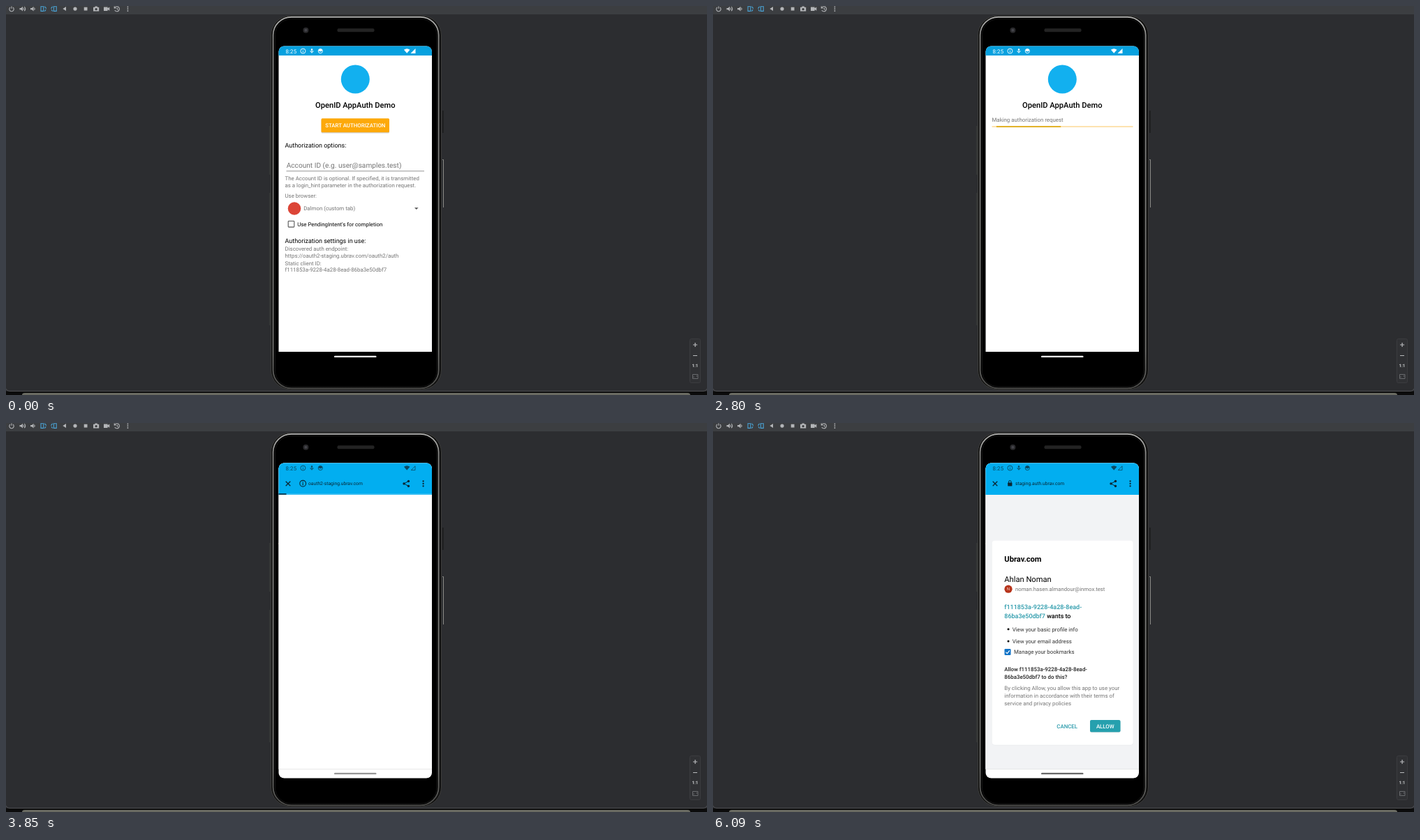
Write an HTML page that moves like this. It is 1004x558 px and loops after 8 s.

```html
<!DOCTYPE html>
<html lang="en">
<head>
<meta charset="utf-8">
<title>Authorization demo</title>
<style>
  html, body { margin: 0; width: 100%; height: 100%; overflow: hidden; background: #2c2d30; }
  svg { display: block; width: 1004px; height: 558px; }
  text { font-family: Roboto, "Open Sans", sans-serif; font-size: 7.86px; text-rendering: geometricPrecision; white-space: pre; }
  .mid { text-anchor: middle; }
  .med { font-weight: 500; }
  .h1 { font-size: 11.15px; }
  .h2 { font-size: 8.97px; }
  .hint { font-size: 10.15px; }
  .url { font-size: 6.73px; }
  .grey { fill: #757575; }
  .line { fill: none; stroke: currentColor; }
</style>
</head>
<body>
<svg viewBox="0 0 1004 558">
  <defs>
    <linearGradient id="rim" x1="0" x2="0" y1="0" y2="1">
      <stop offset="0" stop-color="#b4b4b2"/>
      <stop offset=".06" stop-color="#858583"/>
      <stop offset=".9" stop-color="#72726f"/>
      <stop offset="1" stop-color="#4a4a48"/>
    </linearGradient>
    <clipPath id="screen"><rect x="390.5" y="57.5" width="219.5" height="452" rx="8"/></clipPath>
    <clipPath id="track"><rect x="399.5" y="172" width="202" height="2.2"/></clipPath>

    <g id="status">
      <text x="400.6" y="67.5" style="letter-spacing:.1px">8:25</text>
      <g class="line" stroke-width=".9">
        <circle cx="425.4" cy="64.6" r="3.5"/>
        <path d="M425.4 64.2v2.3M425.4 62.6v.8M438 61.6v6M436 64.2v1.2l2 1 2-1v-1.2"/>
        <circle cx="450.3" cy="64.6" r="3.1"/>
      </g>
      <circle cx="438" cy="62.4" r="1.2"/>
      <path d="M447.2 64a3.2 3.2 0 0 1 6.2 0l-3.1 1.4z"/>
      <path d="M569.9 62.8q4.3-3.2 8.6 0l-4.3 5z"/>
    </g>
    <g id="cross" class="line"><path stroke-width="1.3" d="M400.7 83.7l6.6 6.6M407.3 83.7l-6.6 6.6"/></g>
  </defs>

  <!-- emulator window -->
  <rect width="1004" height="558" fill="#2c2d30"/>
  <rect width="1004" height="12" fill="#3c3e41"/>
  <path d="M0 552.5h1004V558H0z" fill="#0b0b0b"/>
  <path d="M0 549q1 3.5 5 3.5h994q4 0 5-3.5" fill="none" stroke="#55565a" stroke-width=".9"/>
  <path d="M23 558q0-3 4-3h949q4 0 4 3z" fill="#6a6b62"/>

  <g color="#b3b5b8" fill="#b3b5b8" stroke-width="1.1">
    <path class="line" d="M6 2a3.2 3.2 0 1 0 4 0M8 .4v3.4"/>
    <path d="M19.5 3h2l2.5-2.2v6.6L21.500 5.200h-2zM35 3h2l2.500-2.200v6.600L37 5.200h-2z"/>
    <path class="line" d="M25 2.500q1.400 1.600 0 3.200M26.300 1q2.800 3.100 0 6.200M40.500 2.500q1.400 1.600 0 3.200"/>
    <g color="#4aa3d6">
      <path class="line" d="M50 .8h3.800v6.600H50zM55 1.200q2.600.2 2.200 3M57 5.200q-.3 2-2 2.200"/>
      <path class="line" d="M68.400.8h3.800v6.600h-3.800zM67.200 1.200q-2.600.2-2.200 3M65.200 5.200q.3 2 2 2.200"/>
    </g>
    <path d="M81.300 4l4.700-3v6z"/>
    <circle cx="99" cy="4.100" r="2.600"/>
    <rect x="111.700" y="1.700" width="4.800" height="4.800"/>
    <path d="M125 1.800h2l.8-1.200h2.600l.8 1.200h2v5.800H125z"/>
    <circle cx="129.100" cy="4.600" r="1.700" fill="#3c3e41"/>
    <path d="M140 1.500h5.600v1.800l2.700-1.700v5.200l-2.700-1.700v1.900H140z"/>
    <path class="line" d="M155.800 2.600a3.500 3.500 0 1 1 0 3.300M155.200.6v2.400h2.400M159.200 2.500v2l1.300.8"/>
    <circle cx="174.400" cy="1.400" r=".9"/><circle cx="174.400" cy="4.200" r=".9"/><circle cx="174.400" cy="7" r=".9"/>
  </g>

  <g color="#b9bbbd">
    <rect x="979.500" y="477.500" width="15" height="63" rx="2" fill="#303134" stroke="#3b3c3f"/>
    <path class="line" stroke-width="1.200" d="M984 486h6.200M987.100 483v6"/>
    <path class="line" stroke="#696b6e" d="M984 501.500h6"/>
    <text class="mid" x="987" y="518.300" fill="#c8cacc" style="font-size:6.300px;font-weight:700">1:1</text>
    <path class="line" style="stroke:#696b6e" d="M983.500 528.500h7.500v6h-7.500zM985 533v-1.500M989.500 530v1.500"/>
  </g>

  <!-- phone body -->
  <path d="M377.800 172v70M377.800 268v190" stroke="#45463f" stroke-width=".8" fill="none"/>
  <path d="M625.800 150v32" stroke="#1b1b1c" stroke-width="1.500"/>
  <path d="M625 220.500h1.500V289" stroke="#8b8b86" fill="none"/>
  <rect x="379.500" y="14" width="244" height="536" rx="28" fill="#111" stroke="#3c3c3a"/>
  <rect x="382.600" y="15.800" width="237" height="532.500" rx="26" fill="#000" stroke="url(#rim)" stroke-width="1.800"/>
  <rect x="385.500" y="18.500" width="231.500" height="527.500" rx="23" fill="#000" stroke="#161616"/>
  <rect x="474.500" y="32.300" width="53" height="5" rx="2" fill="#232323"/>
  <circle cx="429.400" cy="34.700" r="4" fill="#29292b"/>
  <circle cx="429.400" cy="34.700" r="2" fill="#45454b"/>

  <g clip-path="url(#screen)">
    <!-- demo app -->
    <rect x="390" y="57" width="221" height="439" fill="#fff"/>
    <rect x="390" y="57" width="221" height="14" fill="#07a1df"/>
    <use href="#status" fill="#fff" color="#fff"/>
    <path d="M586.500 61v7h-7z" fill="#fff"/>
    <g id="app">
      <circle cx="500.300" cy="105" r="20.500" fill="#12b0ef"/>
      <text class="h1 med mid" x="500.300" y="146">OpenID AppAuth Demo</text>

      <g id="form">
        <rect x="451.500" y="162.300" width="97.500" height="20.300" rx="1.500" fill="#000" opacity=".18"/>
        <rect x="451.500" y="161.300" width="97.500" height="20" rx="1.500" fill="#fda90a"/>
        <text class="med mid" x="500.300" y="174.300" fill="#fff">START AUTHORIZATION</text>
        <text class="h2" x="399.500" y="203.300">Authorization options:</text>
        <text class="hint grey" x="401.700" y="232.200">Account ID (e.g. user@samples.test)</text>
        <path d="M401.500 236.800h197.500" stroke="#7c7c7c" stroke-width=".8"/>
        <text class="grey" x="399.500" y="250.100">The Account ID is optional. If specified, it is transmitted</text>
        <text class="grey" x="399.500" y="259.500">as a login_hint parameter in the authorization request.</text>
        <text class="grey" x="399.500" y="274.700">Use browser:</text>
        <circle cx="413" cy="290.500" r="9.300" fill="#dc4537"/>
        <text class="grey" x="426.200" y="293.300">Dalmon (custom tab)</text>
        <path d="M585 289.200h5.600l-2.800 2.900z" fill="#555"/>
        <rect x="404.200" y="308.500" width="8.600" height="8.600" rx=".8" fill="none" stroke="#555" stroke-width="1.100"/>
        <text x="417.200" y="315.800">Use PendingIntent's for completion</text>
        <text class="h2" x="399.500" y="340.300">Authorization settings in use:</text>
        <text class="grey" x="399.500" y="351.300">Discovered auth endpoint:</text>
        <text class="grey" x="399.500" y="360.700">https://oauth2-staging.ubrav.com/oauth2/auth</text>
        <text class="grey" x="399.500" y="371.500">Static client ID:</text>
        <text class="grey" x="399.500" y="380.900">f111853a-9228-4a28-8ead-86ba3e50dbf7</text>
      </g>

      <g id="request">
        <text class="grey" x="399.500" y="166.300">Making authorization request</text>
        <g clip-path="url(#track)">
          <rect x="399" y="172" width="203" height="2.200" fill="#fde3b0"/>
          <rect id="runner" y="172" height="2.200" fill="#e2b32c"/>
        </g>
      </g>
    </g>
    <rect id="appPill" x="470" y="501.700" width="60.500" height="2.400" rx="1.200" fill="#fff"/>

    <!-- browser tab -->
    <g id="tab">
      <rect x="390" y="57" width="221" height="453" fill="#fff"/>
      <rect x="390" y="57" width="221" height="46" fill="#02aef0"/>
      <g fill="#0a4a64" color="#0a4a64">
        <use href="#status"/>
        <path class="line" stroke-width=".8" d="M586 61.800v5.800h-5.800z"/>
      </g>

      <g id="slide">
        <g fill="#0b2733" color="#0b2733">
          <use href="#cross"/>
          <circle cx="576.500" cy="83.500" r="1.700"/><circle cx="570" cy="87" r="1.700"/><circle cx="576.500" cy="90.500" r="1.700"/>
          <path class="line" d="M576.500 83.500L570 87l6.500 3.500"/>
          <circle cx="597.600" cy="83.500" r="1.150"/><circle cx="597.600" cy="87" r="1.150"/><circle cx="597.600" cy="90.500" r="1.150"/>
          <g id="first">
            <circle class="line" cx="425.200" cy="86.800" r="4.400" stroke-width="1.100"/>
            <path class="line" stroke-width="1.200" d="M425.200 86.200v3M425.200 84.300v1.100"/>
            <text class="url" x="433" y="89.200">oauth2-staging.ubrav.com</text>
          </g>
          <g id="second">
            <rect x="422.200" y="85.600" width="6.200" height="5" rx=".7"/>
            <path class="line" d="M423.500 86v-1.600a1.800 1.800 0 0 1 3.600 0V86"/>
            <text class="url" x="433" y="89.200">staging.auth.ubrav.com</text>
          </g>
        </g>
        <g id="load">
          <rect x="360" y="101.200" width="280" height="1.800" fill="#3cbff3"/>
          <rect id="bar" x="360" y="101" height="1.900" fill="#0c3f55"/>
        </g>
      </g>

      <g id="page">
        <rect x="390" y="103" width="221" height="393.500" fill="#f2f3f5"/>
        <rect x="399.500" y="169.500" width="202.500" height="293" rx="4" fill="#e9ebee"/>
        <rect x="399.700" y="168.800" width="202" height="293" rx="4" fill="#fff"/>
        <text x="417.300" y="198.500" class="h1" font-weight="700">Ubrav.com</text>
        <text x="417.300" y="227.700" class="h1">Ahlan Noman</text>
        <circle cx="423" cy="238.200" r="5.600" fill="#b7341b"/>
        <text class="mid" x="423" y="240.300" fill="#f3d5cd" style="font-size:6px">N</text>
        <text class="grey" x="433" y="241" style="font-size:7.700px">noman.hasen.almandour@inmox.test</text>
        <text class="h2 med" x="417.300" y="267.200" fill="#2a9aab">f111853a-9228-4a28-8ead-</text>
        <text class="h2 med" x="417.300" y="280.400"><tspan fill="#2a9aab">86ba3e50dbf7</tspan> wants to</text>
        <circle cx="423" cy="295.800" r="1.500"/><circle cx="423" cy="312.900" r="1.500"/>
        <g fill="#333">
          <text x="428.700" y="298.500">View your basic profile info</text>
          <text x="428.700" y="315.600">View your email address</text>
          <text x="431" y="331.200">Manage your bookmarks</text>
        </g>
        <rect x="417.500" y="324" width="9" height="9" rx="1.300" fill="#1173c7"/>
        <path d="M419.400 328.600l1.900 2 3.500-4.300" fill="none" stroke="#fff" stroke-width="1.200"/>
        <g class="med" fill="#222">
          <text x="417.300" y="355.700">Allow f111853a-9228-4a28-8ead-</text>
          <text x="417.300" y="366.900">86ba3e50dbf7 to do this?</text>
        </g>
        <g fill="#757575">
          <text x="417.300" y="382.600">By clicking Allow, you allow this app to use your</text>
          <text x="417.300" y="393.800">information in accordance with their terms of</text>
          <text x="417.300" y="404.900">service and privacy policies</text>
        </g>
        <text class="med mid" x="507.200" y="437.600" fill="#2a9aab">CANCEL</text>
        <rect x="540" y="426.800" width="43.500" height="17.300" rx="2" fill="#c4d5d8"/>
        <rect x="540" y="426" width="43.500" height="17.300" rx="2" fill="#26a0ae"/>
        <text class="med mid" x="561.800" y="437.600" fill="#fff">ALLOW</text>
        <rect id="scroll" x="606.800" y="104" width="2.200" height="361" rx="1" fill="#9b9c9e"/>
      </g>
      <path d="M390 496.500h221" stroke="#e2e2e2" stroke-width=".8"/>
      <rect id="pill" x="470" y="501.700" width="60.500" height="2.400" rx="1.200"/>
    </g>
  </g>
</svg>
<script>
  const LOOP = 8000, STEP = 70;
  const $ = id => document.getElementById(id);
  const set = (id, attrs) => { for (const k in attrs) $(id).setAttribute(k, attrs[k]); };
  const show = (id, on) => { $(id).style.display = on ? '' : 'none'; };
  const clamp = v => Math.max(0, Math.min(1, v));

  // [start time, value]
  const pillShade = [[0, 255], [3010, 225], [3080, 205], [3150, 190], [3220, 180], [3360, 172],
    [3570, 162], [3850, 150], [4060, 140], [4340, 136], [4550, 126], [4760, 104]];
  const loadEnd = [[0, 401.5], [5250, 440], [5320, 513], [5460, 544], [5530, 610]];
  const held = (table, t) => table.reduce((v, [at, next]) => t >= at ? next : v, 0);

  const REQUEST = 2450, OPEN = 2800, REDIRECT = 5250, PAINT = 5530, LOADED = 5600;

  function render(now) {
    const t = Math.floor(now % LOOP / STEP) * STEP;

    show('form', t < REQUEST);
    show('request', t >= REQUEST);
    const run = Math.max(0, t - REQUEST + 60);
    const mid = -4.9 + 37.7 * run / 500, width = 8 + 37.7 * Math.min(1, run / 383);
    set('runner', { x: 399.5 + 2.02 * (mid - width / 2), width: 2.02 * width });

    // the tab fades in while both screens drift left
    const since = t - OPEN;
    const shift = since < 0 ? 22 : since >= 420 ? 0 : 22 * Math.exp(-since / 70);
    set('app', { transform: `translate(${shift - 22} 0)` });
    set('slide', { transform: `translate(${shift} 0)` });
    set('tab', { opacity: clamp((since - 50) / 83) });

    show('first', t < REDIRECT);
    show('second', t >= REDIRECT);
    set('bar', { width: held(loadEnd, t) - 360 });
    show('load', t < LOADED);
    show('page', t >= PAINT);
    set('scroll', { opacity: clamp((6090 - t) / 280) });

    const c = held(pillShade, t);
    set('pill', { fill: `rgb(${c},${c},${c})` });
  }

  const start = performance.now();
  function tick() {
    render(performance.now() - start);
    requestAnimationFrame(tick);
  }
  render(0);
  requestAnimationFrame(tick);
</script>
</body>
</html>
```
